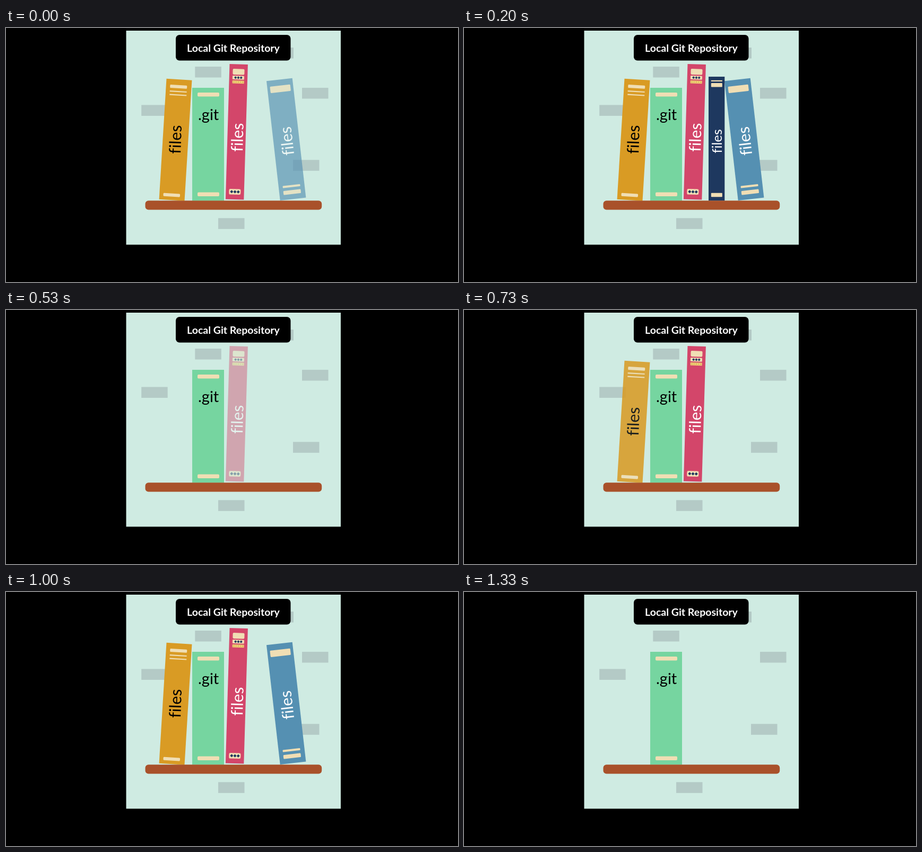
Write an HTML page that moves like this. It is 852 by 480 pixels and loops after 1.39 s.

```html
<!DOCTYPE html>
<html lang="en">
<head>
<meta charset="utf-8">
<title>Bookshelf</title>
<style>
  html, body { margin: 0; width: 100%; height: 100%; overflow: hidden; background: #000; }
  svg { display: block; width: 852px; height: 480px; }
  text { font-family: Lato, sans-serif; font-variant-ligatures: none; text-anchor: middle; }
  .brick { fill: #b4cac6; }
  .cream { fill: #f0deb4; }
  .gem { fill: #1b365d; }
  .label { font-size: 30.5px; fill: #fff; }

  .book { animation: 1390ms step-end infinite; }
  #red { animation-name: red; }
  #yellow { animation-name: yellow; }
  #blue { animation-name: blue; }
  #navy { animation-name: navy; }

  /* Each book fades in on its own, then all are cleared at once. */
  @keyframes red {
    0% { opacity: 1 }
    28.77%, 95.68% { opacity: 0 }
    38.12% { opacity: .42 }
    43.16% { opacity: .93 }
    48.2% { opacity: 1 }
    100% { opacity: 0 }
  }
  @keyframes yellow {
    0% { opacity: 1 }
    28.77%, 95.68% { opacity: 0 }
    48.2% { opacity: .3 }
    52.51% { opacity: .87 }
    57.55% { opacity: 1 }
    100% { opacity: 0 }
  }
  @keyframes blue {
    0%, 66.9% { opacity: .65 }
    5.03%, 71.94% { opacity: 1 }
    28.77%, 95.68% { opacity: 0 }
    62.58% { opacity: .1 }
    100% { opacity: 0 }
  }
  @keyframes navy {
    0% { opacity: 0 }
    9.35%, 76.97% { opacity: .5 }
    14.38%, 81.29% { opacity: 1 }
    28.77%, 95.68% { opacity: 0 }
    100% { opacity: 0 }
  }
</style>
</head>
<body>
<svg viewBox="0 0 852 480">
  <defs>
    <rect id="brick" class="brick" width="49.5" height="20.5"/>
    <g id="gems" class="gem">
      <path id="gem" d="M-3 0 0-3 3 0 0 3Z"/>
      <use href="#gem" x="-6.2"/>
      <use href="#gem" x="6.2"/>
    </g>
  </defs>

  <rect width="852" height="480"/>
  <rect x="226.5" y="5" width="404.5" height="404.5" fill="#cfebe2"/>
  <use href="#brick" x="492.5" y="37"/>
  <use href="#brick" x="356.3" y="73"/>
  <use href="#brick" x="558" y="113"/>
  <use href="#brick" x="255.2" y="145.5"/>
  <use href="#brick" x="541" y="249.3"/>
  <use href="#brick" x="400" y="359.3"/>

  <rect x="320" y="13" width="216.5" height="48.5" rx="7"/>
  <text x="428.5" y="45" font-size="19.5" font-weight="700" fill="#fff">Local Git Repository</text>

  <rect x="351" y="113" width="60" height="213.5" fill="#76d5a0"/>
  <rect class="cream" x="361" y="122" width="41" height="7.5" rx="2"/>
  <rect class="cream" x="361" y="310.5" width="41" height="7.5" rx="2"/>
  <text x="381.6" y="174" font-size="29">.git</text>

  <g id="yellow" class="book">
    <g transform="translate(319.5 211.3) rotate(3.5)">
      <rect x="-24" y="-114.2" width="48" height="228.4" fill="#d99b24"/>
      <rect class="cream" x="-16.4" y="-103.5" width="32" height="6" rx="1.5"/>
      <rect class="cream" x="-16.4" y="-92.5" width="32" height="2.2"/>
      <rect class="cream" x="-16.4" y="-86" width="32" height="2.2"/>
      <rect class="cream" x="-16.6" y="101.5" width="31.5" height="6" rx="1.5"/>
    </g>
    <text class="label" transform="translate(330 211) rotate(-88)" style="fill:#000">files</text>
  </g>

  <g id="red" class="book">
    <g transform="translate(434.9 196.3) rotate(1.7)">
      <rect x="-17.2" y="-127.8" width="34.4" height="255.6" fill="#d3466a"/>
      <rect class="cream" x="-10.8" y="-119" width="22" height="10.8" rx="2"/>
      <rect class="cream" x="-11" y="-106" width="22" height="7" rx="1"/>
      <use href="#gems" transform="translate(0 -102.5) scale(.85)"/>
      <rect x="-11" y="-97" width="22" height="5.5" fill="#ecd071"/>
      <path d="M-9-94.2H10" stroke="#d9905f" stroke-width="1.6" stroke-dasharray="1.6 2.6"/>
      <rect class="cream" x="-11.2" y="108" width="22" height="10.6" rx="2.5"/>
      <use href="#gems" y="113.3"/>
    </g>
    <text class="label" transform="translate(446.8 207) rotate(-88.3)">files</text>
  </g>

  <g id="blue" class="book">
    <g transform="translate(528.2 210.4) rotate(-6.5)">
      <rect x="-24.5" y="-113.6" width="49" height="227.2" fill="#5590b2"/>
      <rect class="cream" x="-19.3" y="-102.3" width="38.4" height="12.2" rx="1.5"/>
      <rect class="cream" x="-16.7" y="87" width="33" height="4" rx="1"/>
      <rect class="cream" x="-16.7" y="96.4" width="33" height="7.6" rx="1.5"/>
    </g>
    <text class="label" transform="translate(540.2 212.5) rotate(-96.5)">files</text>
  </g>

  <g id="navy" class="book">
    <rect x="461" y="92" width="30.3" height="234.3" fill="#1e385f"/>
    <rect class="cream" x="465.8" y="98.8" width="21" height="2.2"/>
    <rect class="cream" x="465.8" y="104" width="21" height="7.5" rx="1"/>
    <rect class="cream" x="465.8" y="311.8" width="21" height="7.4" rx="1"/>
    <text class="label" transform="translate(486 214) rotate(-90)" style="font-size:25.5px">files</text>
  </g>

  <rect x="262.5" y="326.3" width="332.7" height="17.3" rx="6" fill="#a9512a"/>
</svg>
</body>
</html>
```
